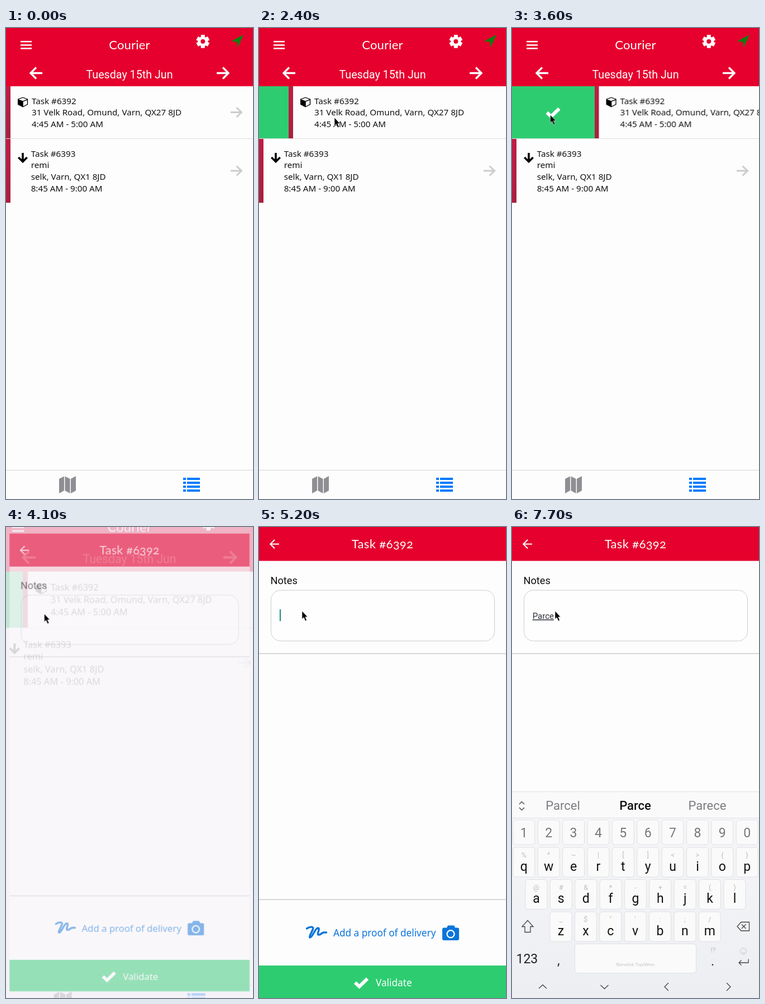
These frames come from a looping animation (442x841 px, 8 s). An HTML page:

```html
<!DOCTYPE html>
<html lang="en">
<head>
<meta charset="utf-8">
<title>Courier task</title>
<style>
html, body { margin: 0; width: 100%; height: 100%; overflow: hidden; background: #fdfdfd; }
svg { display: block; width: 442px; height: 841px; }
text { white-space: pre; }
.head { font: 22px Lato, sans-serif; font-variant-numeric: oldstyle-nums; fill: #fff; text-anchor: middle; }
.body { font: 15.2px "Noto Sans", sans-serif; fill: #111; }
.action { font: 17.2px "Noto Sans", sans-serif; }
.robo { font-family: Roboto, sans-serif; }
.mid { text-anchor: middle; }
.line { fill: none; stroke: #fff; }
.go { fill: none; stroke: #ccc; stroke-width: 3; }
.key { fill: #fafafa; stroke: #dfe0e3; }
.glyph { fill: none; stroke: #444; stroke-width: 1.3; }

#list, #detail { transform-origin: 221px 420.5px; }
#list, #row, #detail, #keys, #caps, #shift, #pointer { animation: 8s step-end infinite; }
#list { animation-name: list; }
#row { animation-name: row; }
#detail { animation-name: detail; }
#keys { animation-name: keys; }
#caps { animation-name: caps; }
#shift { animation-name: shift; }
#pointer { animation-name: pointer; }

@keyframes list {
  0%, 50% { opacity: 1; transform: none; }
  51.25% { opacity: .25; transform: scale(1.077); }
  52.5% { opacity: .05; transform: scale(1.09); }
  53.75%, 100% { opacity: 0; transform: scale(1.1); }
}
@keyframes row {
  0% { transform: none; }
  27.5% { transform: translateX(12px); }
  28.75% { transform: translateX(32px); }
  30% { transform: translateX(53px); }
  31.25% { transform: translateX(77px); }
  32.5% { transform: translateX(98px); }
  33.75% { transform: translateX(114px); }
  35% { transform: translateX(131px); }
  36.25% { transform: translateX(143px); }
  37.5% { transform: translateX(147.5px); }
  50% { transform: translateX(115px); }
  51.25% { transform: translateX(44px); }
  52.5%, 100% { transform: none; }
}
@keyframes detail {
  0% { opacity: 0; transform: scale(.85); }
  51.25% { opacity: .48; transform: scale(.972); }
  52.5% { opacity: .92; transform: scale(.989); }
  53.75% { opacity: 1; transform: scale(.996); }
  55%, 100% { opacity: 1; transform: none; }
}
@keyframes keys {
  0% { transform: translateY(372px); }
  66.25% { transform: translateY(240px); }
  67.5% { transform: translateY(100px); }
  68.75% { transform: translateY(25px); }
  70%, 100% { transform: none; }
}
@keyframes caps {
  0% { text-transform: none; }
  77.5% { text-transform: uppercase; }
  81.25%, 100% { text-transform: none; }
}
@keyframes shift {
  0% { fill: transparent; }
  77.5% { fill: #444; }
  81.25%, 100% { fill: transparent; }
}
@keyframes pointer {
  0% { opacity: 0; transform: translate(395px, 400px); }
  12.5% { opacity: 1; transform: translate(395px, 400px); }
  13.75% { transform: translate(298px, 421px); }
  15% { transform: translate(200px, 365px); }
  16.25% { transform: translate(120px, 290px); }
  17.5% { transform: translate(74px, 228px); }
  18.75% { transform: translate(50px, 185px); }
  20% { transform: translate(38px, 160px); }
  21.25% { transform: translate(33px, 150px); }
  22.5% { transform: translate(31px, 146px); }
  23.75% { transform: translate(36px, 156px); }
  25% { transform: translate(42px, 164px); }
  27.5% { transform: translate(68px, 163px); animation-timing-function: steps(2); }
  30% { transform: translate(135px, 160px); }
  31.25% { transform: translate(176px, 159px); }
  32.5% { transform: translate(212px, 159px); }
  33.75% { transform: translate(236px, 158px); }
  35% { transform: translate(245px, 158px); }
  37.5% { transform: translate(240px, 158px); }
  38.75% { transform: translate(215px, 158px); }
  40% { transform: translate(165px, 157px); }
  41.25% { transform: translate(120px, 156px); }
  42.5% { transform: translate(88px, 155px); }
  43.75% { transform: translate(72px, 155px); }
  45% { transform: translate(68.5px, 155px); }
  57.5% { transform: translate(72px, 153px); }
  58.75% { transform: translate(75px, 151px); }
  60%, 100% { opacity: 1; transform: translate(77px, 150px); }
}
</style>
</head>
<body>
<svg viewBox="0 0 442 841" xmlns="http://www.w3.org/2000/svg">
  <defs>
    <path id="check" d="M-11 0l7.5 7L11-7" fill="none" stroke="#fff" stroke-width="6"/>
    <path id="go" class="go" d="M402 0h19.500M412.500-8.500l9 8.500-9 8.500"/>
    <linearGradient id="stripe" x2="0" y2="1">
      <stop stop-color="#c01c44"/><stop offset="1" stop-color="#a9203f"/>
    </linearGradient>
    <linearGradient id="board" x2="0" y2="1">
      <stop stop-color="#f7f7f9"/><stop offset="1" stop-color="#eceef1"/>
    </linearGradient>
  </defs>
  <rect width="442" height="841" fill="#f2eef6"/>

  <g id="list">
    <rect width="442" height="841" fill="#fdfdfd"/>
    <rect width="442" height="104" fill="#e6002e"/>
    <path class="line" stroke-width="2.500" d="M26 24.200h20M26 30.400h20M26 36.600h20"/>
    <text class="head" x="221" y="38" letter-spacing=".2">Courier</text>
    <g transform="translate(352.300 24)">
      <path class="line" stroke-width="7" d="M0-11.800V11.800M-10.200-5.900L10.200 5.900M-10.200 5.900L10.200-5.900"/>
      <circle r="9" fill="#fff"/><circle r="4" fill="#e6002e"/>
    </g>
    <path d="M425 12L403 23.500l10.500 1.500 .8 10z" fill="#0a8010"/>
    <path class="line" stroke-width="3.300" d="M65 80.500H44M54 70.500l-10 10 10 10M377 80.500h21M388 70.500l10 10-10 10"/>
    <text class="robo mid" x="221" y="90" font-size="19.700" fill="#fff">Tuesday 15th Jun</text>

    <rect y="104" width="148" height="93" fill="#2ecc71"/>
    <use href="#check" x="73.500" y="151"/>
    <g id="row">
      <rect y="104" width="442" height="93" fill="#fdfdfd"/>
      <rect y="104" width="8" height="93" fill="url(#stripe)"/>
      <g transform="translate(21 122) scale(.0109)">
        <path d="M832 128L1664 430V1350L832 1800 0 1350V430z"/>
        <path fill="#fff" d="M896 1629l640-349V644L896 877zM832 764l698-254-698-254-698 254z"/>
      </g>
      <g class="body">
        <text x="46" y="135.700">Task #6392</text>
        <text x="46" y="156.300">31 Velk Road, Omund, Varn, QX27 8JD</text>
        <text x="46" y="176.800">4:45 AM - 5:00 AM</text>
      </g>
      <use href="#go" y="150.500"/>
    </g>
    <rect y="197" width="442" height="1" fill="#dcdcdc"/>
    <rect y="198" width="8" height="114" fill="url(#stripe)"/>
    <path d="M30 223v16M22.300 231l7.700 7.700 7.700-7.700" fill="none" stroke="#000" stroke-width="3.600"/>
    <g class="body">
      <text x="44.700" y="230">Task #6393</text>
      <text x="44.700" y="250.300">remi</text>
      <text x="44.700" y="270.900">selk, Varn, QX1 8JD</text>
      <text x="44.700" y="291.500">8:45 AM - 9:00 AM</text>
    </g>
    <use href="#go" y="255"/>

    <rect y="789" width="442" height="1" fill="#d4d4d6"/>
    <path fill="#8e8e93" d="M95 805l9-4.500V826l-9 5zM105.500 800.500l9 4.500v26l-9-5zM116 805l9-5v26l-9 5z"/>
    <path fill="none" stroke="#007aff" stroke-width="4" d="M317 805h5m2 0h23M317 812h5m2 0h23M317 819h5m2 0h23M317 826h5m2 0h23"/>
  </g>

  <g id="detail">
    <rect width="442" height="841" fill="#fdfdfd"/>
    <rect width="442" height="60.500" fill="#e6002e"/>
    <path class="line" stroke-width="2.100" d="M36 30.500H20.500M28 22.800l-7.700 7.700 7.700 7.700"/>
    <text class="head" x="221" y="38" letter-spacing=".35">Task #6392</text>
    <text class="robo" x="20.500" y="102" font-size="18.200" fill="#111">Notes</text>
    <rect x="21.500" y="113" width="400" height="90.500" rx="17" fill="#fefefe" stroke="#ccc"/>
    <path stroke="#cdcdcf" stroke-width="1.500" d="M0 226h442M0 665.300h442"/>
    <path fill="none" stroke="#0a74da" stroke-width="3.400" stroke-linecap="round" d="M85.500 717c6-4 13-4 11 1s-8 15-5 15c4 0 9-17 14-17 5 1-3 11 1 12 4 1 6-4 9-4h5"/>
    <text class="action" x="133" y="731" fill="#0a74da">Add a proof of delivery</text>
    <path fill="#0a74da" d="M331 715.500h5l2-4h11l2 4h4q3 0 3 3V735q0 3-3 3H331q-3 0-3-3V718.500q0-3 3-3z"/>
    <circle cx="343" cy="726.700" r="6.500" fill="none" stroke="#fff" stroke-width="2.200"/>
    <rect y="783" width="442" height="58" fill="#2ecc71"/>
    <use href="#check" x="183" y="813.500"/>
    <text class="action" x="209" y="820" fill="#fff">Validate</text>
    <g id="note" class="robo" font-size="15" fill="#2c3038" text-decoration="underline"></g>
  </g>

  <g id="keys" class="robo">
    <rect y="472" width="442" height="370" fill="url(#board)"/>
    <rect y="474" width="442" height="45" fill="#fafafb"/>
    <path stroke="#e3e3e6" d="M0 472.500h442M0 519.500h442"/>
    <path class="glyph" stroke="#777" d="M13 495l4.500-4.500L22 495M13 501l4.500 4.500L22 501"/>
    <g id="words" class="mid" font-size="22"></g>
    <g id="caps" class="mid" font-size="23" fill="#111"></g>
    <g id="marks" class="mid" font-size="12.500" fill="#bcbcbf"></g>
    <rect class="key" x="112.500" y="744.500" width="217" height="52" rx="5"/>
    <text class="mid" x="221" y="784" font-size="7.800" fill="#c4c4c6" font-family="Lato, sans-serif">Norvelisk TypeWren</text>
    <path id="shift" class="glyph" d="M28 702.500l-10 11h5v10h10v-10h5z"/>
    <path class="glyph" d="M410 705.500h14.500v15.500H410l-7-7.750zM411 709.500l7.500 7.500m0-7.500l-7.500 7.500"/>
    <g font-size="23" fill="#222">
      <text x="7.500" y="779">123</text><text x="81" y="782">,</text><text x="356" y="783">.</text>
    </g>
    <text class="mid" x="360" y="760" font-size="12" fill="#bcbcbf">!?</text>
    <g fill="none" stroke="#c6c6c9">
      <circle cx="414" cy="757.500" r="5.500"/><path d="M411 759q3 3.500 6 0M411.500 755.500h1m3 0h1"/>
    </g>
    <path class="glyph" d="M423 771.500v6.500h-17m4.500-4.500l-4.500 4.500 4.500 4.500"/>
    <path class="glyph" d="M48 824l7-6.500 7 6.500M158.500 818l7 6.500 7-6.500M280 814l-7 7 7 7M384 814l7 7-7 7"/>
  </g>

  <path id="pointer" d="M0 0V14.500l3.200-3 2.600 6.200 2.600-1.100-2.600-5.900H10z" stroke="#fff" stroke-width=".6"/>
</svg>
<script>
const LOOP = 8000;
const $ = id => document.getElementById(id);

function add(parent, tag, attrs, label) {
  const el = document.createElementNS("http://www.w3.org/2000/svg", tag);
  for (const k in attrs) el.setAttribute(k, attrs[k]);
  if (label) el.textContent = label;
  return parent.appendChild(el);
}

// Visible only between two times of the loop
function show(el, from, to) {
  const step = (opacity, time) => ({ opacity, offset: time / LOOP, easing: "step-end" });
  el.animate([step(0, 0), step(1, from), step(0, to), step(0, LOOP)],
    { duration: LOOP, iterations: Infinity });
}

// Letters, corner marks, first centre, top, height, baseline
const rows = [
  ["1234567890", "", 21.3, 523, 44, 553.5],
  ["qwertyuiop", "%^~|[]<>{}", 21.3, 572, 53, 613.5],
  ["asdfghjkl", "@#&*-+=()", 43.4, 629.5, 53, 671],
  ["zxcvbnm", "_$\"':;/", 87.5, 687, 53, 728.5]
];
for (const [letters, marks, x0, top, height, base] of rows) {
  [...letters].forEach((c, i) => {
    const x = x0 + 44.38 * i;
    add($("caps"), "rect", { class: "key", x: x - 19.5, y: top, width: 39, height, rx: 5 });
    add($("caps"), "text", { x, y: base, fill: marks ? "#111" : "#77777a" }, c);
    if (marks) add($("marks"), "text", { x, y: top + 18 }, marks[i]);
  });
}

// Start time, typed text, three suggestions
const states = [
  [5000, "", "I", "hey", "oh"],
  [6200, "", "I", "Hey", "Oh"],
  [6500, "P", "Please", "P", "Pm"],
  [6700, "Pa", "Pay", "Pa", "Part"],
  [6900, "Par", "Part", "Par", "Parking"],
  [7100, "Parc", "Parcel", "Parc", "Parcels"],
  [7200, "Parce", "Parcel", "Parce", "Parece"]
];

function caret(x, from, to) {
  show(add($("note"), "rect", { x, y: 147, width: 1.9, height: 21, fill: "#0b8a72" }), from, to);
}
caret(37, 5000, 5500);
caret(37, 6000, 6500);

states.forEach(([from, typed, ...words], i) => {
  const to = i + 1 < states.length ? states[i + 1][0] : LOOP;
  const group = add($("words"), "g", {});
  words.forEach((w, n) => add(group, "text", {
    x: [91, 220.5, 349.5][n], y: 505,
    fill: n === 1 ? "#111" : "#7c7c80",
    "font-weight": n === 1 ? 500 : 400
  }, w));
  show(group, from, to);
  if (!typed) return;
  const text = add($("note"), "text", { x: 36.7, y: 164 }, typed);
  show(text, from, to);
  caret(37 + text.getComputedTextLength(), from, Math.min(to, from + 500));
});
</script>
</body>
</html>
```
